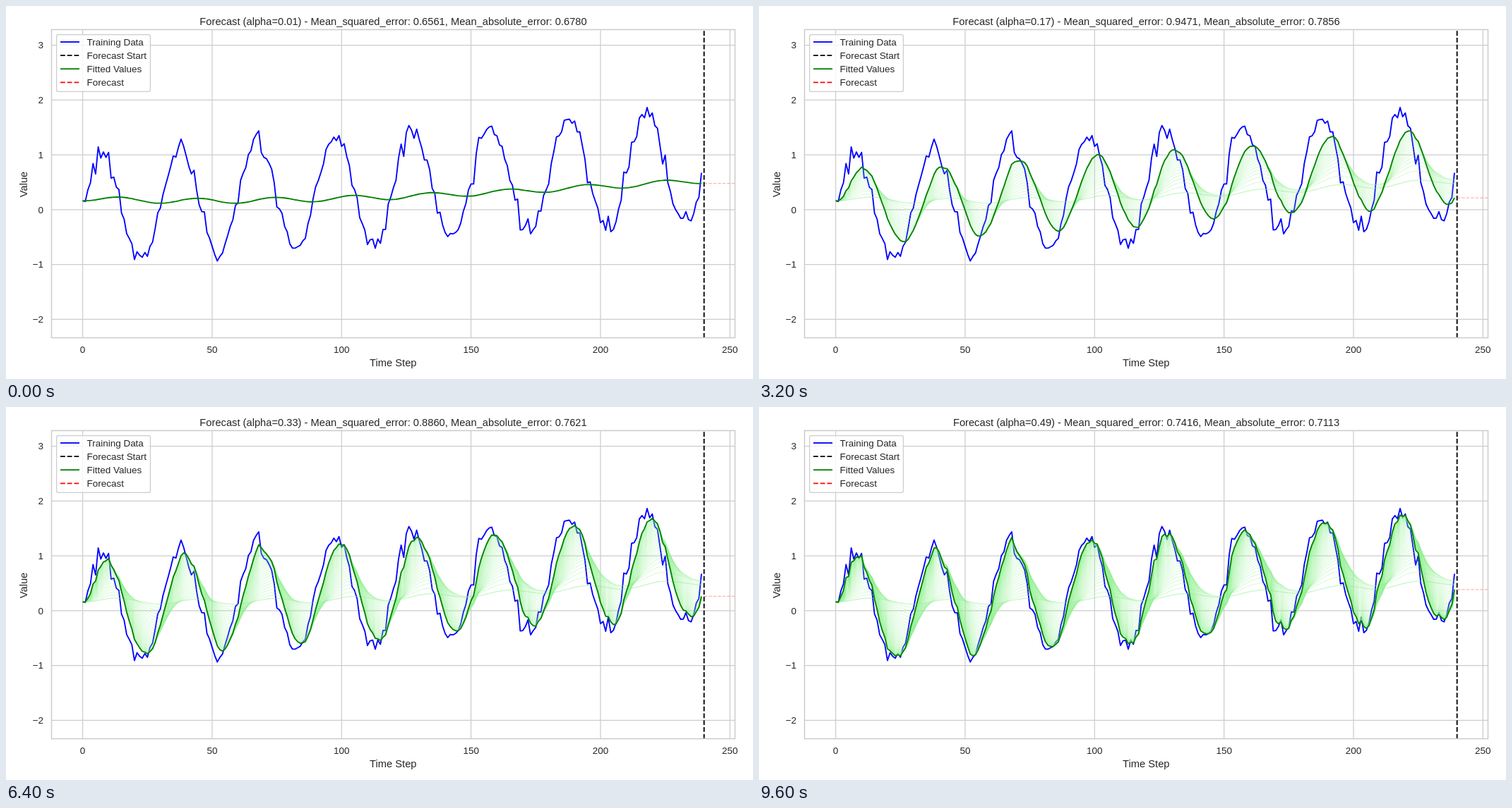
Write an HTML page with a canvas that moves like this. It is 1058 by 529 pixels and loops after 9800 ms.

```html
<!DOCTYPE html>
<html lang="en">
<head>
<meta charset="utf-8">
<title>Exponential smoothing forecast</title>
<style>
  html, body { margin: 0; width: 100%; height: 100%; overflow: hidden; background: #fff; }
  canvas { display: block; width: 1058px; height: 529px; }
</style>
</head>
<body>
<canvas id="chart" width="1058" height="529"></canvas>
<script>
const ctx = document.getElementById('chart').getContext('2d');
const FONT = '"Liberation Sans", Arial, sans-serif';
const INK = '#262626', RULE = '#cccccc';
const BOX = { l: 64.5, t: 33.5, r: 1032.5, b: 470.5 };
const PT = 1.2246;               // pixels per typographic point
const TOTAL = 300, TRAIN = 240;
const STEPS = 49, HOLD = 200;

const px = t => 108.6 + t * 3.667;
const py = v => 288.9 - v * 77.75;

// Mersenne Twister with polar normal deviates
function normals(seed) {
  const mt = new Uint32Array(624);
  mt[0] = seed;
  for (let i = 1; i < 624; i++) {
    mt[i] = Math.imul(1812433253, mt[i - 1] ^ (mt[i - 1] >>> 30)) + i;
  }
  let pos = 624, spare = null;
  function twist() {
    for (let i = 0; i < 624; i++) {
      const y = (mt[i] & 0x80000000) | (mt[(i + 1) % 624] & 0x7fffffff);
      mt[i] = mt[(i + 397) % 624] ^ (y >>> 1) ^ (y & 1 ? 0x9908b0df : 0);
    }
    pos = 0;
  }
  function int32() {
    if (pos === 624) twist();
    let y = mt[pos++];
    y ^= y >>> 11;
    y ^= (y << 7) & 0x9d2c5680;
    y ^= (y << 15) & 0xefc60000;
    return (y ^ (y >>> 18)) >>> 0;
  }
  function uniform() {
    const a = int32() >>> 5, b = int32() >>> 6;
    return (a * 67108864 + b) / 9007199254740992;
  }
  return () => {
    if (spare !== null) {
      const s = spare;
      spare = null;
      return s;
    }
    let u, v, r;
    do {
      u = 2 * uniform() - 1;
      v = 2 * uniform() - 1;
      r = u * u + v * v;
    } while (r >= 1 || r === 0);
    const f = Math.sqrt(-2 * Math.log(r) / r);
    spare = f * u;
    return f * v;
  };
}

const normal = normals(1);
const series = Array.from({ length: TOTAL }, (_, t) =>
  t / (TOTAL - 1) + Math.sin(2 * Math.PI * t / 30) + 0.1 * normal());
const train = series.slice(0, TRAIN), test = series.slice(TRAIN);

function smooth(alpha) {
  let level = train[0];
  return train.map(y => (level += alpha * (y - level)));
}

const mean = list => list.reduce((a, b) => a + b, 0) / list.length;
const runs = Array.from({ length: STEPS }, (_, i) => {
  const alpha = (i + 1) / 100, fit = smooth(alpha), last = fit[TRAIN - 1];
  const mse = mean(test.map(y => (y - last) ** 2));
  const mae = mean(test.map(y => Math.abs(y - last)));
  return {
    fit, last,
    title: `Forecast (alpha=${alpha.toFixed(2)}) - Mean_squared_error: ${mse.toFixed(4)}, ` +
      `Mean_absolute_error: ${mae.toFixed(4)}`
  };
});

function stroke(points, color, width, { alpha = 1, dash = false } = {}) {
  ctx.save();
  ctx.globalAlpha = alpha;
  ctx.strokeStyle = color;
  ctx.lineWidth = width;
  ctx.lineJoin = 'round';
  if (dash) ctx.setLineDash([3.7 * width, 1.6 * width]);
  ctx.beginPath();
  points.forEach(([x, y]) => ctx.lineTo(x, y));
  ctx.stroke();
  ctx.restore();
}

const plot = (values, ...style) => stroke(values.map((v, t) => [px(t), py(v)]), ...style);

function label(text, x, y, size, align = 'center') {
  ctx.font = `${size}px ${FONT}`;
  ctx.fillStyle = INK;
  ctx.textAlign = align;
  ctx.fillText(text, x, y);
}

function drawAxes() {
  for (let t = 0; t <= 250; t += 50) {
    stroke([[px(t), BOX.t], [px(t), BOX.b]], RULE, PT);
    label(t, px(t), 492, 11 * PT);
  }
  for (let v = -2; v <= 3; v++) {
    stroke([[BOX.l, py(v)], [BOX.r, py(v)]], RULE, PT);
    label(String(v).replace('-', '\u2212'), 53, py(v) + 4.8, 11 * PT, 'right');
  }
  label('Time Step', 548.3, 510.5, 12 * PT);
  ctx.save();
  ctx.translate(30, 253);
  ctx.rotate(-Math.PI / 2);
  label('Value', 0, 0, 12 * PT);
  ctx.restore();
}

function drawLegend() {
  ctx.beginPath();
  ctx.roundRect(71.6, 40.6, 132.8, 80.8, 2.7);
  ctx.fillStyle = 'rgba(255,255,255,0.8)';
  ctx.fill();
  ctx.strokeStyle = RULE;
  ctx.lineWidth = PT;
  ctx.stroke();
  [['Training Data', 'blue'], ['Forecast Start', 'black', true],
   ['Fitted Values', 'green'], ['Forecast', 'red', true]].forEach(([text, color, dash], i) => {
    const y = 51 + i * 19.1;
    stroke([[77, y], [104, y]], color, 1.5 * PT, { dash });
    label(text, 114.5, y + 4.8, 11 * PT, 'left');
  });
}

function draw(step) {
  const run = runs[step];
  ctx.fillStyle = '#fff';
  ctx.fillRect(0, 0, 1058, 529);
  drawAxes();

  ctx.save();
  ctx.beginPath();
  ctx.rect(BOX.l, BOX.t, BOX.r - BOX.l, BOX.b - BOX.t);
  ctx.clip();
  plot(train, 'blue', 1.5 * PT);
  stroke([[px(TRAIN), BOX.b], [px(TRAIN), BOX.t]], 'black', 1.5 * PT, { dash: true });
  // the first run is laid down twice
  [runs[0], ...runs.slice(0, step)].forEach(r => plot(r.fit, 'lightgreen', PT, { alpha: 0.3 }));
  plot(run.fit, 'green', 1.5 * PT);
  stroke([[px(TRAIN), py(run.last)], [px(TOTAL - 1), py(run.last)]], 'red', PT, { alpha: 0.3, dash: true });
  ctx.restore();

  ctx.strokeStyle = RULE;
  ctx.lineWidth = 1.25 * PT;
  ctx.strokeRect(BOX.l, BOX.t, BOX.r - BOX.l, BOX.b - BOX.t);
  drawLegend();
  label(run.title, 548.5, 26.5, 12 * PT);
}

let shown = -1;
const start = performance.now();
function tick() {
  const step = Math.floor((performance.now() - start) / HOLD) % STEPS;
  if (step !== shown) draw(shown = step);
  requestAnimationFrame(tick);
}
tick();
</script>
</body>
</html>
```
